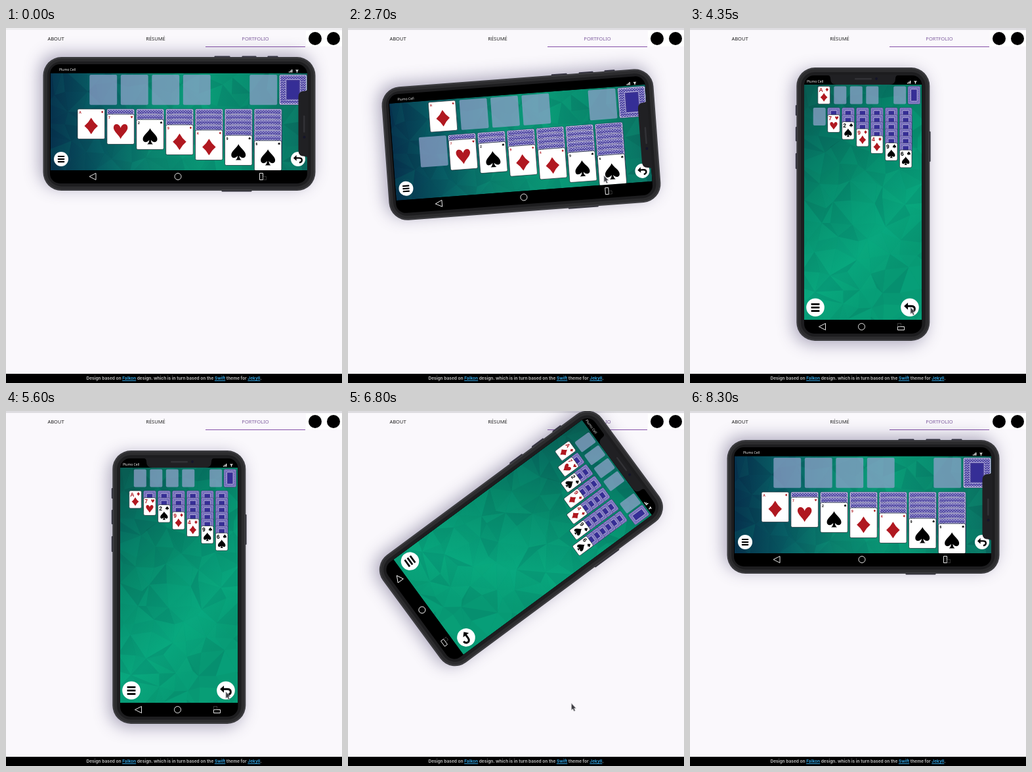
An HTML page with a canvas for the animation above (8350 ms loop, 512x539 px).

```html
<!DOCTYPE html>
<html lang="en">
<head>
<meta charset="utf-8">
<title>Portfolio</title>
<style>
  html, body { margin: 0; width: 100%; height: 100%; overflow: hidden; background: #faf8fc; }
  canvas { position: absolute; left: 0; top: 0; width: 512px; height: 539px; }
  nav { position: absolute; left: 0; top: 3px; width: 456px; height: 26px; display: flex;
        font: 7.5px/26px "Noto Sans", "Open Sans", sans-serif; color: #222; text-align: center; }
  nav span { width: 152px; }
  nav .active { color: #8060a0; box-shadow: inset 0 -1px #8652a8; }
  footer { position: absolute; left: 0; top: 525px; width: 512px; height: 14px; background: #000;
           color: #b4b4b4; font: 700 6.55px/15px Inter, sans-serif; text-align: center; white-space: nowrap; }
  footer u { color: #2f9bd6; }
</style>
</head>
<body>
<nav><span>ABOUT</span><span>RÉSUMÉ</span><span class="active">PORTFOLIO</span></nav>
<footer>Design based on <u>Falkon</u> design. which is in turn based on the <u>Swift</u> theme for <u>Jekyll</u>.</footer>
<canvas id="stage" width="512" height="539"></canvas>
<script>
const LOOP = 8350;
const canvas = document.getElementById('stage');
const ctx = canvas.getContext('2d');
const ratio = window.devicePixelRatio || 1;
canvas.width = 512 * ratio;
canvas.height = 539 * ratio;

const RED = '#b01820';
const CARRIER = 'Plumo Cell';
const CARDS = [['A', 'diamond'], ['7', 'heart'], ['2', 'spade'], ['9', 'diamond'],
               ['4', 'diamond'], ['9', 'spade'], ['6', 'spade']];

// Both layouts use page coordinates of the phone at rest in that orientation.
const LAND = {
  cx: 264, cy: 145.8, glass: [67, 55, 392, 181], view: [68, 68.5, 391, 147.5],
  w: 41.5, h: 45.5, colX: 109, gapX: 44.9, colY: 123, gapY: 8,
  topY: 71, cells: [127.3, 174.8, 222.3, 269.8, 371.3], deckX: 416.7,
  menu: [84, 199], undo: [445, 199], button: 11, bar: 225.5, barX: [132, 262, 391.5],
  carrier: [81, 65], signal: [433, 65.5],
  sky: [68, 140, 459, 150], colors: ['#06304c', '#075a62', '#0a866f', '#099a76', '#08876c', '#0a6d60']
};
const PORT = {
  cx: 264, cy: 267.5, glass: [174, 72, 179.5, 392], view: [174, 86, 179.5, 357],
  w: 18.6, h: 26.8, colX: 187.7, gapX: 21.95, colY: 121, gapY: 10.7,
  topY: 88.6, cells: [194.8, 219.3, 243.8, 268.3, 310.2], deckX: 332,
  menu: [191, 424.3], undo: [335, 424.3], button: 13.8, bar: 453.5, barX: [201.5, 261.5, 321.5],
  carrier: [178, 82.5], signal: [333, 82.5],
  sky: [170, 110, 370, 310], colors: ['#08584f', '#066f60', '#068568', '#079673', '#08a57c', '#079a74']
};

const CURSOR = [[50, 472, 328], [800, 135, 150], [1750, 135, 150], [2350, 390, 224], [3450, 390, 224],
                [4150, 336, 424], [5450, 336, 424], [6200, 323, 451], [6650, 323, 451],
                [7050, 384, 426], [7500, 516, 380]];

const lerp = (a, b, p) => a + (b - a) * p;
const ramp = (t, start, span) => Math.min(1, Math.max(0, (t - start) / span));
const quad = p => p < .5 ? 2 * p * p : 1 - 2 * (1 - p) ** 2;
const cubic = p => p < .5 ? 4 * p ** 3 : 1 - 4 * (1 - p) ** 3;
const noise = n => { const s = Math.sin(n * 127.1 + 11.7) * 43758.5453; return s - Math.floor(s); };

function box(x, y, w, h, r, fill, stroke, line = 1) {
  ctx.beginPath();
  ctx.roundRect(x, y, w, h, r);
  if (fill) { ctx.fillStyle = fill; ctx.fill(); }
  if (stroke) { ctx.strokeStyle = stroke; ctx.lineWidth = line; ctx.stroke(); }
}

function disc(x, y, r, fill) {
  ctx.beginPath();
  ctx.arc(x, y, r, 0, Math.PI * 2);
  ctx.fillStyle = fill;
  ctx.fill();
}

function poly(points) {
  ctx.beginPath();
  points.forEach(([x, y]) => ctx.lineTo(x, y));
  ctx.closePath();
}

function local(x, y, scale, draw) {
  ctx.save();
  ctx.translate(x, y);
  ctx.scale(scale, scale);
  draw();
  ctx.restore();
}

const SUITS = {
  diamond: new Path2D('M0-.5Q.16-.2.41 0Q.16.2 0 .5Q-.16.2-.41 0Q-.16-.2 0-.5Z'),
  heart: new Path2D('M0 .47C-.1.22-.43.02-.43-.22C-.43-.5-.08-.5 0-.2C.08-.5.43-.5.43-.22C.43.02.1.22 0 .47Z'),
  spade: new Path2D('M0-.5C.1-.26.44-.08.44.16C.44.4.15.38.05.2Q.06.4.18.47H-.18Q-.06.4-.05.2C-.15.38-.44.4-.44.16C-.44-.08-.1-.26 0-.5Z')
};

function drawSuit(suit, x, y, size) {
  local(x, y, size, () => {
    ctx.fillStyle = suit === 'spade' ? '#000' : RED;
    ctx.fill(SUITS[suit]);
  });
}

function drawFace(m, [rank, suit], x, y) {
  const { w, h } = m;
  const small = m === PORT;
  box(x, y, w, h, 2.2, '#fff', '#1c2a30', .7);
  ctx.fillStyle = suit === 'spade' ? '#000' : RED;
  ctx.font = small ? 'bold 8.5px "Liberation Sans", Arial, sans-serif' : 'bold 5px "Liberation Sans", Arial, sans-serif';
  ctx.fillText(rank, x + (small ? 1.6 : 2.2), y + (small ? 8.5 : 6.6));
  drawSuit(suit, x + w - (small ? 4.6 : 3.8), y + (small ? 5 : 4.4), small ? 5.8 : 4);
  drawSuit(suit, x + w / 2, y + h * (small ? .62 : .565), small ? 13 : 25);
}

function drawBack(m, x, y) {
  const { w, h } = m;
  const small = m === PORT;
  box(x, y, w, h, 2, small ? '#a09ad4' : '#f1effa', '#2b2568', .6);
  ctx.save();
  box(x + 1.2, y + 1.2, w - 2.4, h - 2.4, 1.2, small ? '#6f67b6' : '#463d9c');
  ctx.clip();
  ctx.strokeStyle = small ? 'rgba(205,200,240,.25)' : 'rgba(240,238,255,.85)';
  ctx.lineWidth = .8;
  for (let row = 3; row < h; row += 3.6) {
    ctx.beginPath();
    for (let i = 0; i * 2 <= w + 2; i++) ctx.lineTo(x + i * 2, y + row + (i % 2 ? 1.3 : -1.3));
    ctx.stroke();
  }
  ctx.restore();
  box(x + w * .24, y + h * .16, w * .52, h * .68, .8, '#3b3293', '#d5d1ee', .7);
  box(x + w * .31, y + h * .22, w * .38, h * .56, .5, '#352e96');
}

function drawWallpaper(m) {
  const [x, y, w, h] = m.view;
  const sky = ctx.createLinearGradient(...m.sky);
  m.colors.forEach((c, i) => sky.addColorStop(i / (m.colors.length - 1), c));
  ctx.fillStyle = sky;
  ctx.fillRect(x, y, w, h);
  const cell = 26;
  const corner = (i, j) => [x + (i - .5 + noise(i * 17 + j * 3.7) * .8) * cell,
                            y + (j - .5 + noise(i * 5.3 + j * 29) * .8) * cell];
  for (let j = 0; j * cell < h + cell; j++) {
    for (let i = 0; i * cell < w + cell; i++) {
      const a = corner(i, j), b = corner(i + 1, j), c = corner(i + 1, j + 1), d = corner(i, j + 1);
      const halves = (i + j) % 2 ? [[a, b, c], [a, c, d]] : [[a, b, d], [b, c, d]];
      halves.forEach((tri, k) => {
        const v = noise(i * 7 + j * 31 + k * 13.3) - .5;
        poly(tri);
        ctx.fillStyle = v > 0 ? `rgba(20,200,150,${v * .2})` : `rgba(0,50,65,${-v * .22})`;
        ctx.fill();
      });
    }
  }
}

function drawCards(m, other, t, slide) {
  const dx = m.view[0] - other.view[0], dy = m.view[1] - other.view[1];
  const place = f => {
    const [x0, y0] = f(other), [x1, y1] = f(m);
    return [lerp(x0 + dx, x1, slide), lerp(y0 + dy, y1, slide)];
  };
  const slot = (x, y) => box(x, y, m.w + .4, m.h + .2, 2, 'rgba(146,164,205,.72)');
  [...m.cells, m.deckX].forEach(x => slot(x, m.topY));
  CARDS.forEach((_, i) => slot(m.colX + i * m.gapX, m.colY));
  drawBack(m, ...place(l => [l.deckX, l.topY]));
  CARDS.forEach((card, col) => {
    if (!col) return;
    for (let row = 0; row < col; row++)
      drawBack(m, ...place(l => [l.colX + col * l.gapX, l.colY + row * l.gapY]));
    drawFace(m, card, ...place(l => [l.colX + col * l.gapX, l.colY + col * l.gapY]));
  });
  const lift = quad(ramp(t, 1500, 250)) - quad(ramp(t, 4450, 250));
  drawFace(m, CARDS[0], ...place(l => [lerp(l.colX, l.cells[0], lift), lerp(l.colY, l.topY, lift)]));
}

function drawButtons(m) {
  const scale = m.button / 14;
  local(...m.menu, scale, () => {
    disc(0, 0, 14, '#fff');
    [-6.5, -1.3, 3.9].forEach(y => box(-6.5, y, 13, 2.8, .6, '#000'));
  });
  local(...m.undo, scale, () => {
    disc(0, 0, 14, '#fff');
    ctx.fillStyle = ctx.strokeStyle = '#000';
    poly([[-9, -2], [-3, -7.5], [-3, 3.5]]);
    ctx.fill();
    ctx.lineWidth = 3;
    ctx.stroke(new Path2D('M-4-2H2Q7.5-2 7.5 2.2Q7.5 6 2.5 6.8'));
  });
}

function drawSystemBars(m) {
  ctx.fillStyle = '#fff';
  ctx.font = '5.1px "Open Sans", "Noto Sans", sans-serif';
  ctx.fillText(CARRIER, ...m.carrier);
  const [sx, sy] = m.signal;
  for (let i = 0; i < 3; i++) ctx.fillRect(sx - 2 + i * 2, sy + .5 - i * 1.5, 1.3, 1.5 + i * 1.5);
  poly([[sx + 8, sy - 2], [sx + 13, sy - 2], [sx + 10.5, sy + .6]]);
  ctx.fill();
  ctx.fillRect(sx + 9.8, sy, 1.4, 2);

  const [back, home, turn] = m.barX, y = m.bar;
  ctx.strokeStyle = '#fff';
  ctx.lineWidth = .9;
  poly([[back - 5, y], [back + 5, y - 5], [back + 5, y + 5]]);
  ctx.stroke();
  ctx.beginPath();
  ctx.arc(home, y, 5, 0, Math.PI * 2);
  ctx.stroke();
  const upright = m === LAND;
  if (upright) box(turn - 5, y - 5, 5, 10, 0, null, '#fff', .9);
  else box(turn - 5, y, 10, 5, 0, null, '#fff', .9);
  ctx.setLineDash([1, 1]);
  if (upright) box(turn, y, 5, 5, 0, null, '#777', .8);
  else box(turn - 5, y - 5, 5, 5, 0, null, '#999', .8);
  ctx.setLineDash([]);
}

function drawScreen(m, other, t, slide) {
  ctx.save();
  box(...m.glass, 15, '#000');
  ctx.clip();
  ctx.save();
  ctx.beginPath();
  ctx.rect(...m.view);
  ctx.clip();
  drawWallpaper(m);
  drawCards(m, other, t, slide);
  drawButtons(m);
  ctx.restore();
  drawSystemBars(m);
  ctx.restore();
}

function drawBody(angle) {
  const cos = Math.cos(angle), sin = Math.sin(angle);
  [[117, 16], [150, 22], [190, 24]].forEach(([y, h]) => box(160.8, y, 4, h, 1, '#333338'));
  box(362, 157, 4.6, 46, 1, '#333338');
  ctx.save();
  ctx.shadowColor = 'rgba(62,54,100,.42)';
  ctx.shadowBlur = 24 * ratio;
  ctx.shadowOffsetX = (-5 * cos - 5 * sin) * ratio;
  ctx.shadowOffsetY = (-5 * sin + 5 * cos) * ratio;
  box(162.3, 60, 203, 415, 28, '#38383b');
  ctx.restore();
  box(164, 61.7, 199.6, 411.6, 26.5, '#2c2c2e', '#454549', .8);
  box(169, 67, 189.6, 401.5, 21, '#1d1d1f');
}

function drawNotch() {
  ctx.fillStyle = '#202023';
  ctx.fill(new Path2D('M209 71H318Q313 72 313 77Q313 86 304 86H223Q214 86 214 77Q214 72 209 71Z'));
  box(251, 76, 26, 2.4, 1.2, '#323236');
  disc(284, 77, 2, '#15152a');
}

function drawCursor(t) {
  const next = CURSOR.findIndex(k => k[0] > t);
  if (next < 1) return;
  const [t0, x0, y0] = CURSOR[next - 1], [t1, x1, y1] = CURSOR[next];
  const p = quad((t - t0) / (t1 - t0));
  local(lerp(x0, x1, p), lerp(y0, y1, p), 1, () => {
    poly([[0, 0], [0, 10.2], [2.3, 8.3], [4, 12], [5.8, 11.2], [4.2, 7.6], [7, 7.3]]);
    ctx.fillStyle = '#3d3d42';
    ctx.strokeStyle = '#c4c4c8';
    ctx.lineWidth = .8;
    ctx.fill();
    ctx.stroke();
  });
}

function draw(t) {
  ctx.setTransform(ratio, 0, 0, ratio, 0, 0);
  ctx.clearRect(0, 0, 512, 539);
  ctx.fillStyle = t < 1500 ? '#eeedf0' : '#dddce0';
  ctx.fillRect(0, 0, 512, 3);
  ctx.fillStyle = '#fff';
  ctx.fillRect(457, 4, 55, 24);
  disc(471, 16, 10, '#000');
  disc(499, 16, 10, '#000');

  // The shift runs slightly ahead of the turn.
  const rise = 2587, fall = 6534;
  const turn = 1 - cubic(ramp(t, rise, 500)) + cubic(ramp(t, fall, 500));
  const shift = 1 - ramp(t, rise, 440) + ramp(t, fall, 440);
  const cy = lerp(PORT.cy, LAND.cy, shift);
  const angle = turn * Math.PI / 2;
  const portrait = t >= 3100 && t < 7100;
  const slide = t < 3100 ? 1 : quad(ramp(t, portrait ? 3100 : 7100, 350));
  const pose = (m, a, paint) => {
    ctx.save();
    ctx.translate(264, cy);
    ctx.rotate(a);
    ctx.translate(-m.cx, -m.cy);
    paint();
    ctx.restore();
  };
  pose(PORT, angle, () => drawBody(angle));
  if (portrait) pose(PORT, angle, () => drawScreen(PORT, LAND, t, slide));
  else pose(LAND, angle - Math.PI / 2, () => drawScreen(LAND, PORT, t, slide));
  pose(PORT, angle, drawNotch);
  drawCursor(t);
}

const start = performance.now();
function tick() {
  draw((performance.now() - start) % LOOP);
  requestAnimationFrame(tick);
}
tick();
</script>
</body>
</html>
```
